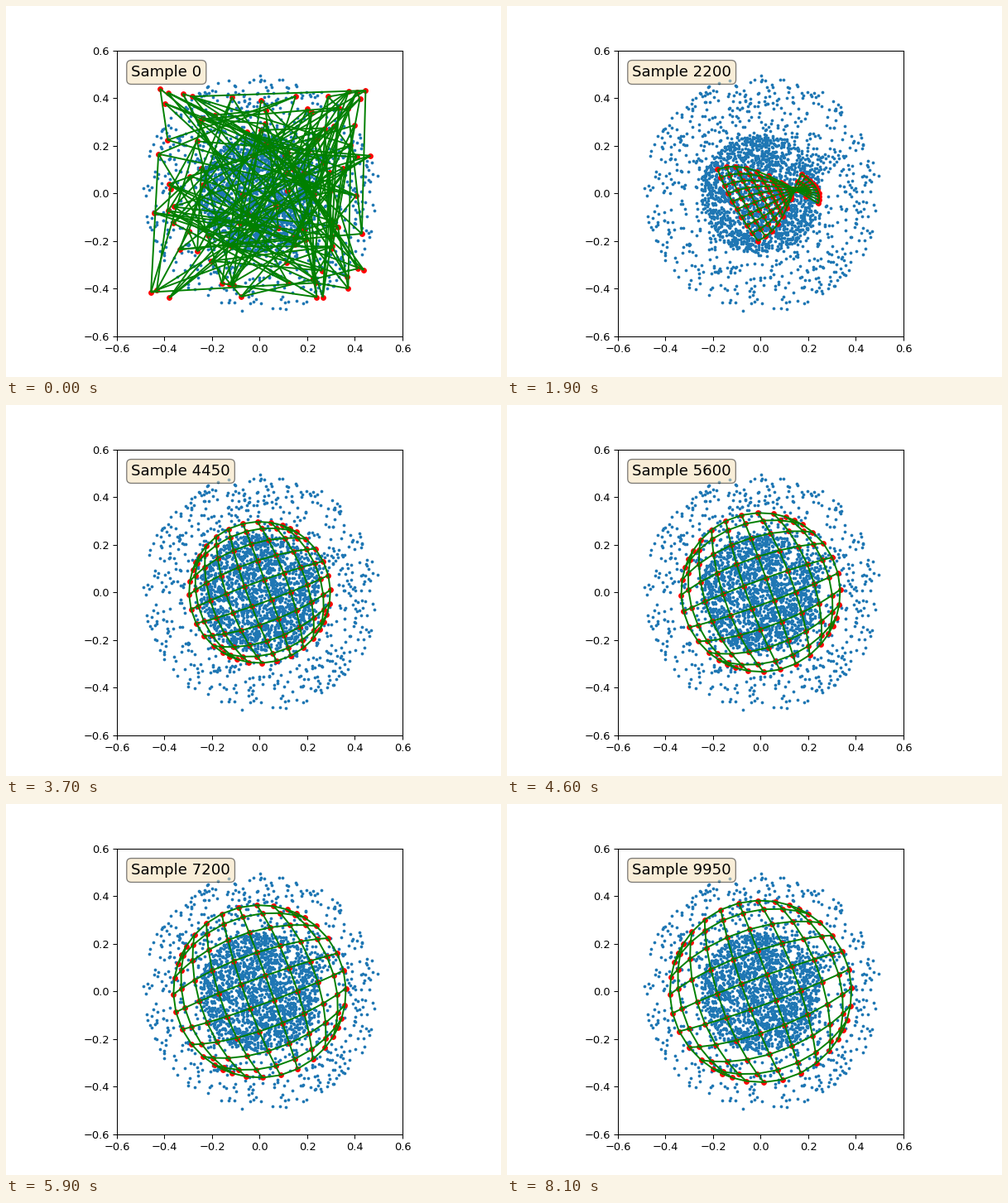
Recreate the animation shown at these times as a matplotlib script. Size 598 by 448 pixels, loop 8.2 s.

```python
import numpy as np
import matplotlib.pyplot as plt
from matplotlib.animation import FuncAnimation
from matplotlib.collections import LineCollection

FRAMES, INTERVAL = 82, 100
N = 10                       # nodes per side of the map
DPI = 93.4375
TWISTED, FLAT = 44, 89       # update steps where the map is twisted / untwisted

rng = np.random.default_rng(7)


def smooth(x):
    x = np.clip(x, 0, 1)
    return x * x * (3 - 2 * x)


def disc(count, radius):
    r = radius * np.sqrt(rng.random(count))
    a = 2 * np.pi * rng.random(count)
    return np.column_stack([r * np.cos(a), r * np.sin(a)])


def random_start():
    """Uniform scatter, with a few far nodes that set the outline."""
    far = [(0.445, 0.432), (0.465, 0.158), (0.412, -0.316), (0.265, -0.436),
           (-0.457, -0.415), (-0.445, -0.082), (-0.283, 0.407), (0.375, 0.43)]
    rest = rng.uniform(-0.44, 0.44, (N * N - len(far), 2))
    return rng.permutation(np.vstack([far, rest])).reshape(N, N, 2)


def twisted_map():
    """Bow tie: columns run left to right, their half-length flips past the waist."""
    t = np.linspace(0, 1, N)[:, None]
    v = np.linspace(-1, 1, N)[None, :]
    half = np.cos(2 * t)
    x = -0.11 + 0.345 * t + 0.085 * half * v + 0.014 * v ** 2 * (1 - 3 * t)
    y = 0.02 - 0.07 * (1 - t) ** 2 - 0.15 * half * v
    return np.stack([x, y], axis=-1)


def round_map():
    """Square grid pressed into a unit disc, denser at the rim, turned by 20 degrees."""
    side = np.sin(np.radians(np.linspace(-75, 75, N))) / np.sin(np.radians(75))
    a, b = np.meshgrid(side, -side, indexing="ij")
    x, y = a * np.sqrt(1 - b * b / 2), b * np.sqrt(1 - a * a / 2)
    c, s = np.cos(np.radians(20)), np.sin(np.radians(20))
    lean = 1 - x * x - y * y
    return np.stack([x * c - y * s - 0.025 * lean, x * s + y * c - 0.01 * lean], axis=-1)


data = np.vstack([disc(1600, 0.25), disc(1000, 0.5)])
START, BOW, ROUND = random_start(), twisted_map(), round_map()
WAIST = BOW.mean(axis=(0, 1))


def step_at(frame):
    return int(max(frame, np.floor(2.5 * frame - 3)))


def nodes_at(step):
    if step < TWISTED:
        size = 0.4 + 0.6 * smooth(step / TWISTED)
        chaos = np.exp(-step / 6.5)
        return chaos * START + (1 - chaos) * (WAIST + (BOW - WAIST) * size)
    radius = 0.39 - 0.093 * np.exp((FLAT - step) / 45)
    progress = (step - TWISTED) / (FLAT - TWISTED)
    delay = 0.6 * np.linspace(0, 1, N)[:, None, None]
    blend = smooth(1.6 * progress - delay)
    return (1 - blend) * BOW + blend * radius * ROUND


def edges(p):
    down = np.stack([p[:, :-1], p[:, 1:]], axis=2).reshape(-1, 2, 2)
    across = np.stack([p[:-1], p[1:]], axis=2).reshape(-1, 2, 2)
    return np.concatenate([down, across])


fig, ax = plt.subplots(figsize=(598.01 / DPI, 448.01 / DPI), dpi=DPI)
ax.set_aspect("equal")
ax.set(xlim=(-0.6, 0.6), ylim=(-0.6, 0.6))
ticks = np.linspace(-0.6, 0.6, 7).round(1)
ax.set_xticks(ticks)
ax.set_yticks(ticks)
ax.scatter(*data.T, s=3.5, color="C0")
dots = ax.scatter(*START.reshape(-1, 2).T, s=18, color="red")
mesh = ax.add_collection(LineCollection(edges(START), colors="green", linewidths=1.5),
                         autolim=False)
label = ax.text(0.05, 0.95, "Sample 0", transform=ax.transAxes, fontsize=14, va="top",
                bbox=dict(boxstyle="round", facecolor="wheat", alpha=0.5))


def update(frame):
    step = step_at(frame)
    p = nodes_at(step)
    dots.set_offsets(p.reshape(-1, 2))
    mesh.set_segments(edges(p))
    label.set_text(f"Sample {50 * step}")
    return dots, mesh, label


anim = FuncAnimation(fig, update, frames=FRAMES, interval=INTERVAL, repeat=True,
                     repeat_delay=0, blit=False)
plt.show()
```
